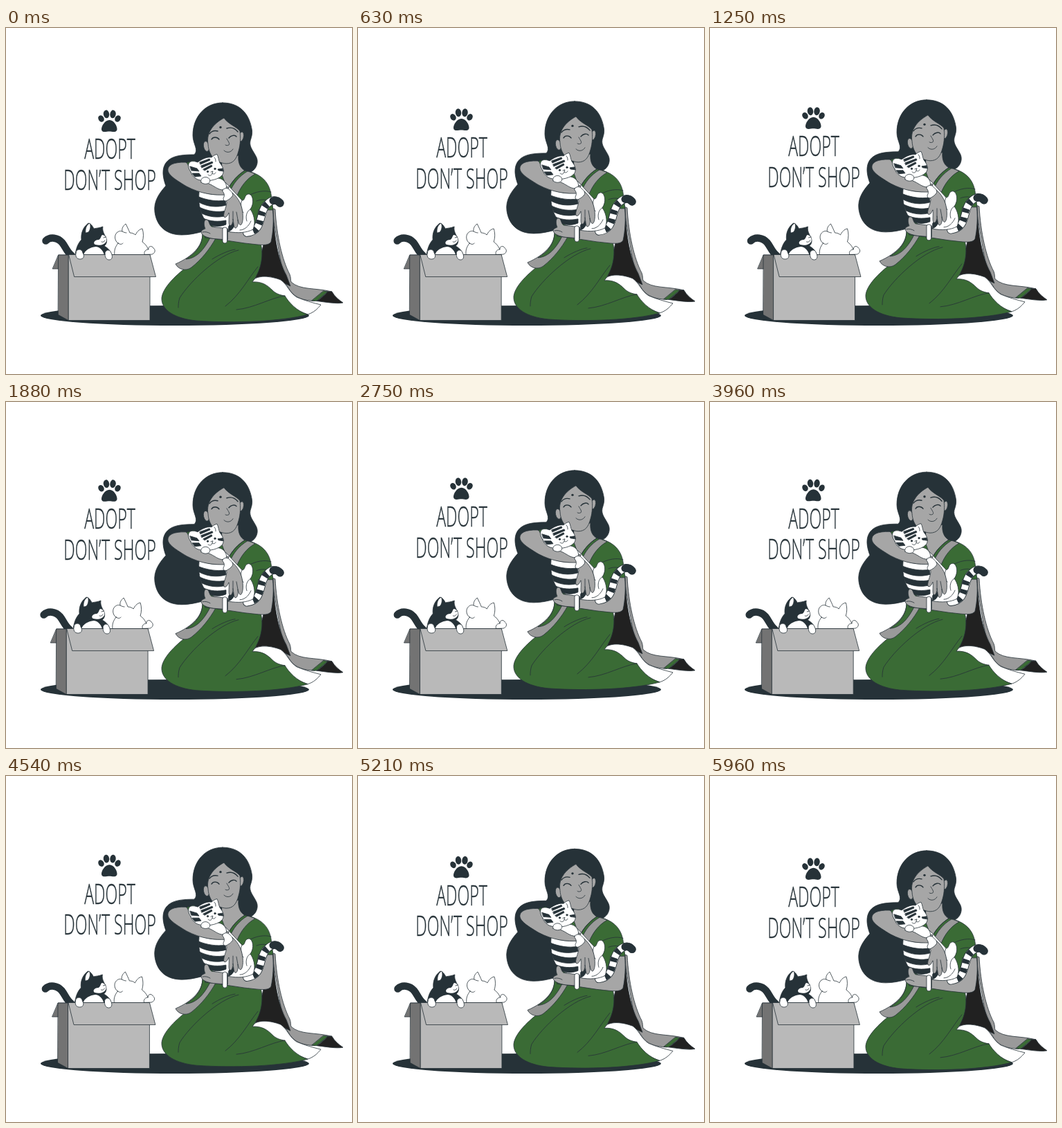
Write an HTML page that moves like this. It is 500 px wide and 500 px high and loops after 6000 ms.

```html
<!DOCTYPE html>
<html lang="en">
<head>
<meta charset="utf-8">
<title>Adopt, don't shop</title>
<style>
  html, body { margin: 0; width: 100%; height: 100%; overflow: hidden; background: #fff; }
  svg { display: block; width: 100%; height: 100%; }
  path, ellipse, circle { stroke-linecap: round; stroke-linejoin: round; }
  .o > * { stroke: #263238; stroke-width: .8; }
  .dark { fill: #263238; }
  .cloth { fill: #212121; }
  .green { fill: #3a6b35; }
  .skin { fill: #a6a6a6; }
  .trim { fill: #9a9a9a; }
  .white { fill: #fff; }
  .front { fill: #b9b9b9; }
  .side { fill: #737373; }
  .line { fill: none; }
  .o > .bare { stroke: none; }
  text { font: 300 40px "Open Sans", "Noto Sans", sans-serif; text-anchor: middle;
    fill: #263238; stroke: #263238; stroke-width: .3; vector-effect: non-scaling-stroke; }
</style>
</head>
<body>
<svg viewBox="0 0 500 500">
  <ellipse class="dark" cx="244" cy="415.5" rx="194" ry="14.5"/>

  <g id="box" class="o">
    <!-- black cat -->
    <path class="line" style="stroke-width:10.5" d="M57.500 307.500C64 301 75 303 81 310C86 316 88 324 95 329"/>
    <path class="dark" d="M100 328C101 319 104 311 109 306C108 297 111 288 119 282C123 283 125 286 127 290C131 289 135 289 140 287C139 292 141 296 143 300C147 306 146 312 142 315C149 319 153 324 152 331H100Z"/>
    <path class="white" d="M115 296C114 289 117 284 121 282C123 286 122 292 119 295Z"/>
    <path class="white bare" d="M139 299C143 299 146 304 145 308C143 313 136 315 129 313C125 311 128 306 134 306C137 305 137 301 139 299Z"/>
    <path class="white bare" d="M112 328C114 321 121 317 130 316C137 317 141 323 142 329Z"/>
    <path class="line" d="M141 303L144.500 302M138 309C140 310 142 309 143 307"/>

    <!-- white cat -->
    <path class="white" d="M162 311C157 308 156 300 160 296C163 293 166 293 168 294C167 290 169 286 173 283C175 287 177 291 179 296C182 296 185 297 187 299C189 295 192 291 197 290C199 296 199 303 197 309C204 314 207 321 207 328H157C156 321 158 316 162 311Z"/>
    <path class="line" d="M168 294C170 295 172 296 174 296M162 311C165 313 167 313 169 311"/>

    <!-- carton -->
    <path class="side" d="M76 328H88V348H67.500Z"/>
    <path class="side" d="M76 328H91V423L75.500 414.500Z"/>
    <path class="front" d="M90.500 327.500H208V422.500H90.500Z"/>
    <path class="front" d="M91 327.500H208L216.500 359.500H99Z"/>

    <path class="white" d="M101 325C101 319 110 318 111 325C114 330 112 334 107 334C102 334 100 330 101 325Z"/>
    <path class="white" d="M143 327C142 321 150 318 152 325C155 331 153 335 149 335C145 335 143 331 143 327Z"/>
    <path class="white" d="M200 327C199 323 202 320 206 320C205 315 211 314 213 318C217 321 215 326 211 327Z"/>
  </g>

  <g id="float">
    <g class="dark">
      <path d="M149.500 133C156 133 161 142 160.500 147C159 152 153 149.500 149.500 149.500C145 149.500 139 152 138 147C137.500 142 143 133 149.500 133Z"/>
      <ellipse rx="4" ry="5" transform="translate(137.500 131) rotate(-30)"/>
      <ellipse rx="4.200" ry="5.900" transform="translate(145 124.500) rotate(-8)"/>
      <ellipse rx="4.200" ry="5.900" transform="translate(154.500 124.500) rotate(8)"/>
      <ellipse rx="4" ry="5" transform="translate(161.500 131) rotate(30)"/>
    </g>
    <g transform="translate(150) scale(.58 1)">
      <text y="189.500">ADOPT</text>
      <text y="234">DON’T SHOP</text>
    </g>

    <g class="o">
      <!-- hair -->
      <path class="dark" d="M313 108C288 108 270 128 270 155C270 168 279 176 272 183C257 183 244 184 236 190C225 198 225 212 231 228C221 239 213 251 215 266C218 288 233 299 254 299C264 299 274 297 285 294L318 205L330 200C334 208 339 210 345 210C360 210 366 196 362 187C358 178 351 172 353 163C355 157 356 153 355.500 148C352 124 338 108 313 108Z"/>

      <!-- trailing drape -->
      <path class="trim" d="M384 260L389 262C391 300 399 335 410 356C412 361 411 364 412 367C425 379 446 375 471 381L446 394.500C431 394 418 390 411 380L402 366Z"/>
      <path class="cloth" d="M384 260L386 262C387 300 393 335 405 357L411 373C398 366 382 362 360 364L372 313Z"/>
      <path class="green" d="M459 380L465 381L449 394.500L442 394Z"/>
      <path class="cloth" d="M465 381L471 381C475 388 481 393 487 397C478 399 461 396 449 394.500C455 391 461 386 465 381Z"/>
      <path class="white" d="M354 367C363 355 384 359 397 364C406 370 409 382 420 389C432 394 443 397 455 400C450 406 445 411 436 414L404 402Z"/>

      <!-- skirt -->
      <path class="green" d="M288 298L368 311C373 330 368 352 356 367C370 366 378 372 385 379C390 384 396 386 403 387C409 397 420 409 436 414C400 424 330 427 275 423C245 420 224 408 225 390C227 372 253 351 268 340C280 330 285 315 288 298Z"/>
      <path class="trim" d="M284 298C284 315 270 330 245 341C249 349 260 352 268 346C283 334 294 320 303 304Z"/>
      <path class="green" d="M284 298C284 313 275 325 260 334C276 333 287 319 295 303Z"/>
      <path class="line" d="M336 321C306 328 266 366 251 390C249 396 249 401 249 404M331 320C323 321 309 327 298 334M364 345C350 362 338 386 317 402M403 387C382 390 358 405 333 407"/>

      <!-- torso -->
      <path class="green" d="M284 225L320 205L345 206C368 210 380 222 383 240L386 263L366 270L368 312L288 303Z"/>
      <path class="skin" d="M312 188L336 184C335 194 338 202 345 206C335 212 326 222 320 234L312 212Z"/>
      <path class="trim" d="M349 207C337 214 328 225 323 238L334 242C339 230 347 218 360 211C356 209 353 208 349 207Z"/>
      <path class="line" d="M345 206C335 212 326 222 320 234M383 237C374 234 361 236 349 243M381 250C374 247 367 248 362 250"/>

      <!-- face -->
      <ellipse class="skin" cx="289.500" cy="171" rx="4" ry="7.500" transform="rotate(-12 289.500 171)"/>
      <ellipse class="skin" cx="340" cy="157" rx="3.500" ry="7" transform="rotate(12 340 157)"/>
      <path class="skin" d="M315 130C321 139 334 143 338 149C339 158 339 168 336 178C333 190 328 196 318 196C305 195 293 186 292 168C289 151 300 138 315 130Z"/>
      <circle class="dark bare" cx="310" cy="143.500" r="1.700"/>
      <path class="line" style="stroke-width:1.400" d="M297 161C299 157 305 157 308 161M322 159C325 155 331 154 333 157M294 153C297 149 302 148 306 149M319 145C325 143 331 145 335 150"/>
      <path class="line" d="M319 160C321 164 324 167 322 169C320 170 318 170 317 169M315 177C319 181 325 180 328 175"/>

      <!-- right arm, behind the pet -->
      <path class="skin" d="M365 263L385.500 263C387 279 386 296 383 309C379 316 365 313 345 311L305 305L300 290L350 294C359 289 363 276 365 263Z"/>

      <!-- held cat: tail, body, hind leg -->
      <path class="line" style="stroke-width:11.500" d="M348 296C374 293 364 265 378 254C384 248 391 247 396 253"/>
      <path class="line" style="stroke:#fff;stroke-width:9.800" d="M348 296C374 293 364 265 378 254C384 248 391 247 396 253"/>
      <path class="line" style="stroke-width:10;stroke-linecap:butt;stroke-dasharray:6 7" d="M357 293C371 287 365 265 378 254"/>
      <path class="line" style="stroke-width:11" d="M386 249.500C390 248.500 393 250 396 253"/>
      <path class="white" d="M282 222C276 242 278 266 289 279C304 294 339 301 357 291C362 280 357 267 353 262C360 252 356 239 350 240C344 241 346 250 341 249L318 224Z"/>
      <g class="dark">
        <path d="M280 231C291 235 303 237 314 236L315 240C302 242 290 240 279 235Z"/>
        <path d="M278.500 244C291 249 305 251 317 249L318 256C304 260 290 258 279 252Z"/>
        <path d="M279.500 259C292 265 306 267 318 264L319 271C306 275 293 273 283 268Z"/>
        <path d="M285 275C296 280 307 280 318 278L318 284C308 288 299 287 291 283Z"/>
        <path d="M322 286L327 280L331 283C329 289 326 293 321 294Z"/>
      </g>
      <path class="line" d="M341 249C338 255 340 263 343 267M353 262C347 265 346 274 348 279M338 292C345 292 351 286 354 279"/>

      <!-- right hand -->
      <path class="skin" d="M320 306L300 304.500C290 303 283 300 282 295C282 292 286 291 288 290C285 284 286 276 290 277C294 278 293 284 297 287L320 290Z"/>
      <path class="line" d="M284 295C288 294 292 295 295 297"/>
      <rect class="white" x="313" y="288" width="6.500" height="23" rx="3"/>

      <!-- left arm -->
      <path class="skin" d="M269 195C255 193 239 194 235 201C230 210 243 218 261 229C282 240 302 242 318 241L322 230C303 228 286 222 272 208Z"/>
      <path class="green" d="M261 194.500L272 191L274 210L266 206C264 202 264 198 261 194.500Z"/>

      <!-- held cat: head and forelegs -->
      <path class="white" d="M287 216C294 218 307 214 314 220C320 226 320 233 314 234C306 234 301 228 293 225Z"/>
      <path class="white" d="M267 208C263 203 262 195 267 193C271 192 274 193 277 194C284 189 291 186 297 187C299 185 302 183 305 182.500C307 186 307 191 309 195C315 202 316 210 311 214C305 220 288 223 277 219C271 216 268 212 267 208Z"/>
      <g class="dark">
        <path d="M280 194L294 189L295 191L281 197Z"/>
        <path d="M282 199L298 193L299 195L283 202Z"/>
        <path d="M285 204L297 198L298 200L287 206Z"/>
        <path d="M266 200L276 203L279 207L268 206Z"/>
        <path d="M269 210L279 210L282 214L273 215Z"/>
        <path d="M313 203L306 204L307 206L314 207Z"/>
        <circle cx="291.500" cy="207.500" r="1.200"/>
        <circle cx="302" cy="203.500" r="1.200"/>
      </g>
      <path class="line" d="M296 208L299 207L298 210C297 214 294 214 292 212M298 210C300 212 302 211 303 209M301 187C303 189 303 191 303 193"/>
      <path class="white" d="M282 223C280 218 286 214 291 216C296 218 296 224 291 225C288 226 284 225 282 223Z"/>

      <!-- left hand and bangle -->
      <path class="skin" d="M316 245L327 238C334 244 339 252 341 261C343 270 343 280 340 284C338 286 336 283 335 277C336 284 334 290 331 289C329 288 329 281 328 276C328 282 326 287 323 285C321 282 323 274 322 267C320 271 318 275 315 273C313 269 319 258 319 252Z"/>
      <path class="line" d="M335 277L333 266M328 276L328 265"/>
      <path class="white" d="M314 233C317 231 321 231 323 234C327 237 329 241 327 243C325 246 322 248 318 250C314 250 313 247 315 244C316 241 315 238 313 236Z"/>
    </g>
  </g>
</svg>
<script>
  const LOOP = 6000, RISE = 10;
  // Sideways offsets at each tenth of the loop
  const SHAKE = [0, -1, 2, -4, 4, -4, 4, -4, 2, -1, 0];
  const box = document.getElementById('box');
  const float = document.getElementById('float');

  function draw() {
    const p = performance.now() % LOOP / LOOP;
    const i = Math.floor(p * 10);
    const x = SHAKE[i] + (SHAKE[i + 1] - SHAKE[i]) * (p * 10 - i);
    const y = -RISE * (1 - Math.abs(2 * p - 1));
    box.setAttribute('transform', `translate(${x} 0)`);
    float.setAttribute('transform', `translate(0 ${y})`);
    requestAnimationFrame(draw);
  }
  draw();
</script>
</body>
</html>
```
